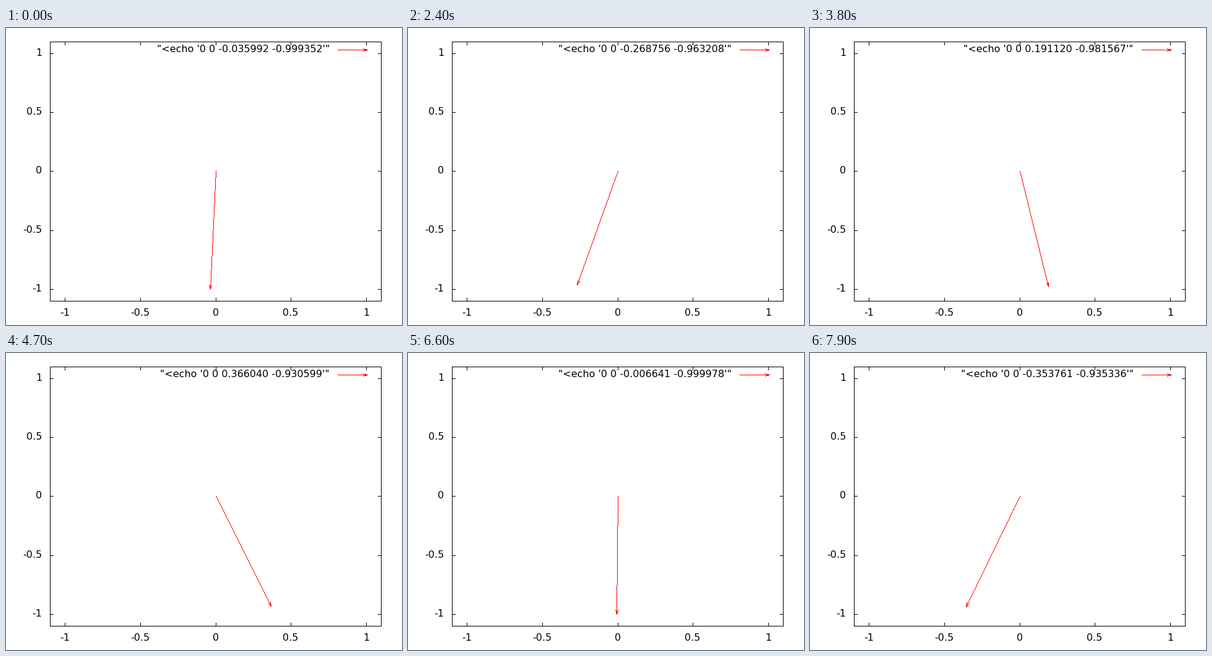
A matplotlib script for the animation above (8000 ms loop, 640x480 px).

```python
import numpy as np
import matplotlib.pyplot as plt
from matplotlib.animation import FuncAnimation

W, H, DPI = 640, 480, 100
FRAMES, STEP_MS = 80, 100
LEFT, TOP, RIGHT, BOTTOM = 71, 22, 606, 441
LIMIT = 1.1
TICS = (-1, -0.5, 0, 0.5, 1)
TIC_LEN = 5
HEAD_LEN, HEAD_ANGLE = 7.07, np.radians(15)
KEY_Y = 35
BLACK, RED = (0, 0, 0), (255, 0, 0)


def px(x):
    return int(LEFT + (x + LIMIT) * (RIGHT - LEFT) / (2 * LIMIT) + 0.5)


def py(y):
    up = (y + LIMIT) * (BOTTOM - TOP) / (2 * LIMIT)
    return BOTTOM - int(up + 0.5)


def line(img, x0, y0, x1, y1, color):
    """One-pixel line without antialiasing."""
    n = max(abs(x1 - x0), abs(y1 - y0)) + 1
    xs = np.floor(np.linspace(x0, x1, n) + 0.5).astype(int)
    ys = np.floor(np.linspace(y0, y1, n) + 0.5).astype(int)
    img[ys, xs] = color


def arrow(img, x0, y0, x1, y1):
    line(img, x0, y0, x1, y1, RED)
    back = np.arctan2(y0 - y1, x0 - x1)
    for a in (back - HEAD_ANGLE, back + HEAD_ANGLE):
        line(img, x1, y1, round(x1 + HEAD_LEN * np.cos(a)),
             round(y1 + HEAD_LEN * np.sin(a)), RED)


def backdrop():
    img = np.full((H, W, 3), 255, np.uint8)
    for x in (LEFT, RIGHT):
        line(img, x, TOP, x, BOTTOM, BLACK)
    for y in (TOP, BOTTOM):
        line(img, LEFT, y, RIGHT, y, BLACK)
    for v in TICS:
        x, y = px(v), py(v)
        line(img, x, TOP, x, TOP + TIC_LEN, BLACK)
        line(img, x, BOTTOM, x, BOTTOM - TIC_LEN, BLACK)
        line(img, LEFT, y, LEFT + TIC_LEN, y, BLACK)
        line(img, RIGHT, y, RIGHT - TIC_LEN, y, BLACK)
    arrow(img, 536, KEY_Y, 584, KEY_Y)
    return img


def swing(count, push=-0.036, pull=0.009):
    """Pendulum angles by symplectic Euler, starting at rest position."""
    angle, speed, angles = 0.0, push, []
    for _ in range(count):
        angle += speed
        speed -= pull * np.sin(angle)
        angles.append(angle)
    return angles


fig = plt.figure(figsize=(W / DPI, H / DPI), dpi=DPI, facecolor="white")


def put(x, y, text, ha):
    return fig.text(x / W, 1 - y / H, text, ha=ha, va="baseline",
                    family="DejaVu Sans", size=16 * 72 / DPI, color="black")


base = backdrop()
angles = swing(FRAMES)
picture = fig.figimage(base, origin="upper")
for v in TICS:
    put(px(v), 465, f"{v:g}", "center")
    put(58, py(v) + 4, f"{v:g}", "right")
key = put(523, KEY_Y + 4, "", "right")


def draw(i):
    x, y = np.sin(angles[i]), -np.cos(angles[i])
    img = base.copy()
    arrow(img, px(0), py(0), px(x), py(y))
    picture.set_data(img)
    key.set_text(f"\"<echo '0 0 {x:.6f} {y:.6f}'\"")
    return picture, key


anim = FuncAnimation(fig, draw, frames=FRAMES, interval=STEP_MS,
                     repeat=True, repeat_delay=0)
plt.show()
```
